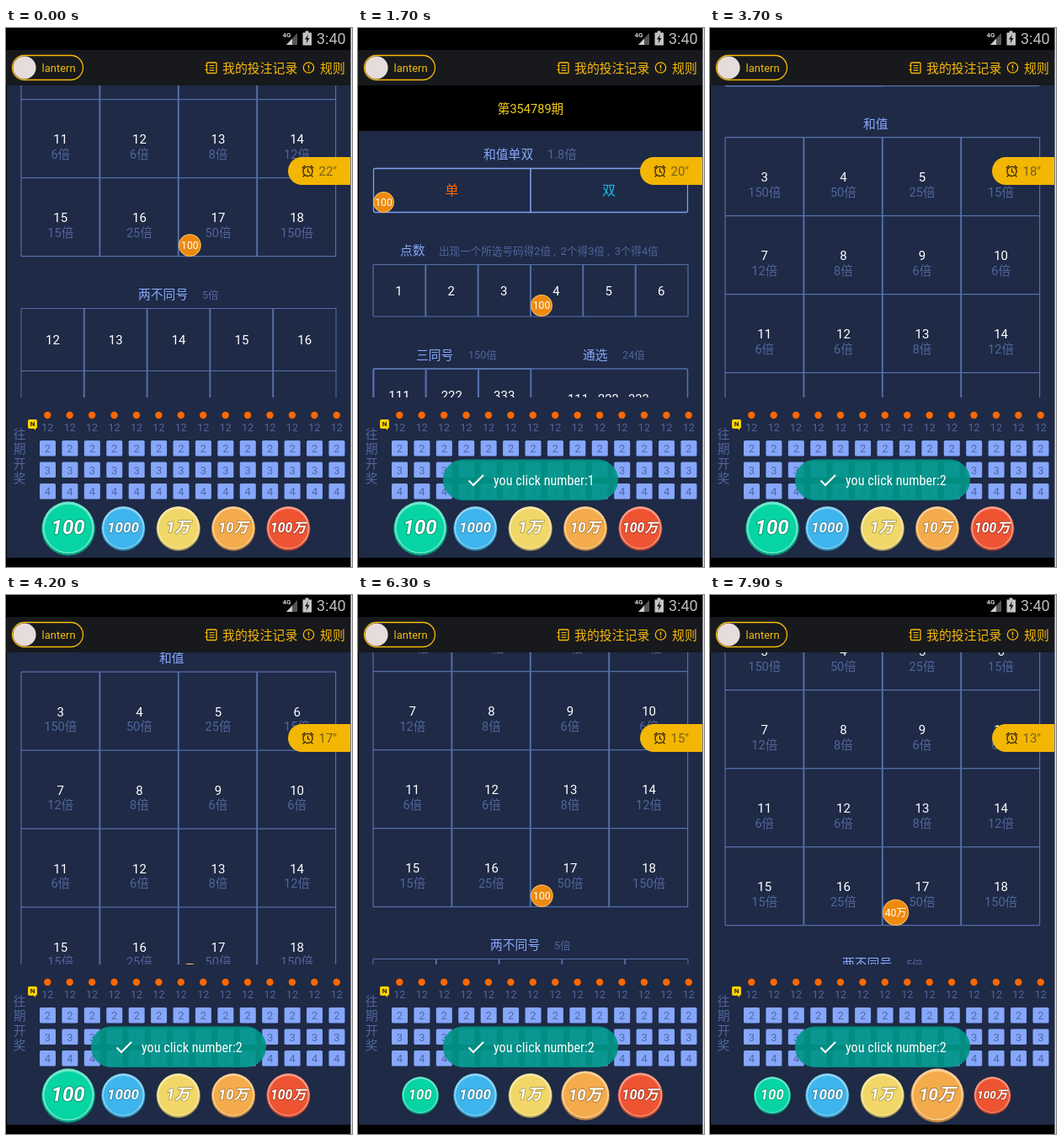
Animation of 411 by 639 pixels, one loop 8000 ms. Source, as an HTML page:

```html
<!DOCTYPE html>
<html lang="zh-CN">
<head>
<meta charset="utf-8">
<style>
html, body { margin: 0; width: 100%; height: 100%; overflow: hidden; background: #000; }
svg { display: block; width: 100vw; height: 100vh; }
text { font-family: Roboto, 'Noto Sans CJK SC', 'Noto Sans CJK', sans-serif; white-space: pre; }
#toast text { font-family: 'Roboto Condensed', Roboto, 'Open Sans', sans-serif; font-stretch: condensed; }
</style>
</head>
<body>
<svg id="stage" viewBox="0 0 411 639" xmlns="http://www.w3.org/2000/svg"></svg>
<script>
const LOOP = 8000, TICK = 100;
const BG = '#1e2a46', LINE = '#566fab', HEAD = '#88a8f8', DIM = '#50659c', GOLD = '#f7b909';
const BRIGHT = '#7f9eec', ORANGE = '#ff6700', INK = '#33290a';

// Drawing helpers; text y is the vertical middle of the glyphs.
const text = (x, y, s, size, fill, anchor = 'middle', extra = '') =>
  `<text x="${x}" y="${y + size * 0.36}" font-size="${size}" fill="${fill}" text-anchor="${anchor}" ${extra}>${s}</text>`;
const rect = (x, y, w, h, fill, extra = '') =>
  `<rect x="${x}" y="${y}" width="${w}" height="${h}" fill="${fill}" ${extra}/>`;
const circle = (x, y, r, fill, extra = '') =>
  `<circle cx="${x}" cy="${y}" r="${r}" fill="${fill}" ${extra}/>`;
const path = (d, stroke, width) => `<path d="${d}" fill="none" stroke="${stroke}" stroke-width="${width}"/>`;
const shape = (d, fill) => `<path d="${d}" fill="${fill}"/>`;
const range = (n, f) => Array.from({ length: n }, (_, i) => f(i)).join('');

function grid(x, y, cols, rows, w, h, edge = 1.2, inner = 1.9) {
  const across = range(rows + 1, i => `M${x} ${y + i * h}h${cols * w}`);
  const sides = `M${x} ${y}v${rows * h}m${cols * w} 0v${-rows * h}`;
  const down = range(cols - 1, i => `M${x + (i + 1) * w} ${y}v${rows * h}`);
  return path(across + sides, LINE, edge) + path(down, LINE, inner);
}

const heading = (x, y, title, subX = 0, sub = '', size = 12.6) =>
  text(x, y, title, 14.8, HEAD, 'start') + text(subX, y, sub, size, DIM, 'start');

// A chip is anchored at its bottom left corner.
const chip = (id, x, bottom, r = 13) =>
  `<g id="${id}" transform="translate(${x} ${bottom})"></g>`;
const chipFace = (label, r) =>
  circle(r, -r, r - 0.6, '#ee8a0c', 'stroke="#f6b45c" stroke-width="1.2"') + text(r, -r, label, 12.2, '#fff');

function board() {
  const odds = [150, 50, 25, 15, 12, 8, 6, 6];
  const cell = 374 / 6;
  return rect(1, 68, 408.5, 54, '#000') + text(205, 96, '第354789期', 14.6, '#f5cf18') +

    heading(149, 150, '和值单双', 225, '1.8倍', 14.6) +
    rect(18.5, 166.5, 373, 52, 'none', `rx="2" stroke="${BRIGHT}" stroke-width="1.3"`) +
    path('M205 166.5v52', BRIGHT, 1.6) +
    text(111.5, 192.5, '单', 16, ORANGE) + text(298, 192.5, '双', 16, '#16bdf0') +

    heading(50, 264, '点数', 96, '出现一个所选号码得2倍 ,  2个得3倍 ,  3个得4倍') +
    grid(18, 280.5, 6, 1, cell, 61.5) +
    range(6, i => text(48.5 + i * cell, 312, i + 1, 15, '#fff')) +

    heading(69, 387.5, '三同号', 131, '150倍') + heading(267, 387.5, '通选', 314, '24倍') +
    rect(18.5, 404, 373, 122, 'none', `rx="2" stroke="${LINE}" stroke-width="1.6"`) +
    grid(18.3, 404, 3, 2, cell, 61, 2, 2.2) +
    range(6, i => text(49 + i % 3 * cell, i > 2 ? 496.5 : 436, 111 * (i + 1), 15, '#fff')) +
    text(249, 440, '111   222   333', 14.8, '#fff', 'start') +
    text(250, 492.5, '444   555  666', 14.8, '#fff', 'start') +

    heading(182, 571, '和值') + grid(18, 587.2, 4, 4, 93.4, 93) +
    range(16, i => {
      const x = 64.8 + i % 4 * 93.6, y = 587 + (i >> 2) * 93;
      return text(x, y + 47.5, i + 3, 15, '#fff') +
        text(x, y + 65, odds[Math.min(i, 15 - i)] + '倍', 14.6, DIM);
    }) +

    heading(157, 1004.5, '两不同号', 233, '5倍') + grid(18, 1021, 5, 3, 74.8, 74, 1) +
    range(5, i => text(55.5 + i * 74.8, 1058.5, i + 12, 15, '#fff')) +

    chip('odd', 18, 219) + chip('even', 205, 219.5) + chip('four', 205, 342) + chip('sum', 205, 959.5);
}

function statusBar() {
  return rect(0, 0, 411, 26, '#000') +
    text(328.5, 8.5, '4G', 8, '#ccc', 'start', 'font-weight="700"') +
    shape('M333 20L346 6V20Z', '#555') + shape('M333 20L340 12.5V20Z', '#ccc') +
    shape('M352.5 5.5h3v-2h4v2h3.5v15h-10.5z', '#c4c4c4') +
    shape('M359 7.5l-4 6h2.5l-1 5 4-6.5h-2.5z', '#111') +
    text(369, 13, '3:40', 18, '#bdbdbd', 'start');
}

function header() {
  const outline = `stroke="${GOLD}" stroke-width="1.3"`;
  return rect(0, 26, 411, 42, '#17191c') +
    rect(7.5, 32.5, 84, 29, 'none', `rx="14.5" ${outline}`) +
    circle(22, 47, 13.6, '#e6dcdc') + text(42.5, 47, 'lantern', 13, GOLD, 'start') +
    rect(238.5, 41, 11.5, 12.5, 'none', `rx="1" ${outline}`) +
    path('M241.5 44.5h6m-6 2.8h6m-6 2.8h6M236.5 44.5h3m-3 5h3', GOLD, 1.1) +
    text(257, 47.5, '我的投注记录', 14.9, GOLD, 'start') +
    circle(359.5, 47, 6.2, 'none', outline) + path('M359.5 43.5v4.3m0 1.2v1.5', GOLD, 1.5) +
    text(373, 47.5, '规则', 14.9, GOLD, 'start');
}

function timer() {
  return shape('M409 153H351.5a16.5 16.5 0 0 0 0 33H409z', '#f3b602') +
    circle(358.5, 170, 5.6, 'none', `stroke="${INK}" stroke-width="1.3"`) +
    path('M358.5 166.5v3.8l2.5 1.5M351.7 166.3l3.6-3.3m10 3.3l-3.6-3.3M354.5 174.5l-2 2m10-2l2 2', INK, 1.3) +
    text(371.5, 170, '', 15, '#75601f', 'start', 'id="clock"');
}

function results() {
  const title = [...'往期开奖'].map((c, i) => text(16.2, 481.5 + i * 17.4, c, 14.8, DIM)).join('');
  const tag = shape('M28 464h7a2 2 0 0 1 2 2v7a2 2 0 0 1-2 2v2l-2-2h-5a2 2 0 0 1-2-2v-7a2 2 0 0 1 2-2z', '#fdd000') +
    text(31.5, 469.5, 'N', 8, '#222', 'middle', 'font-weight="700"');
  return title + tag + range(14, i => {
    const x = 49.3 + i * 26.42;
    return circle(x, 459, 4.2, ORANGE) + text(x, 473.5, 12, 12.6, DIM) +
      range(3, j => rect(x - 9.3, 489 + j * 25.5, 19, 18.5, '#86a7fc', 'rx="1.5"') +
        text(x + 0.2, 498.5 + j * 25.5, j + 2, 13, '#5068a8'));
  });
}

const COINS = [['100', '#06d5a3'], ['1000', '#3eb5ec'], ['1万', '#f0d768'], ['10万', '#f4ab4c'], ['100万', '#ee5432']];
const REST = 26, PICKED = 31.7, DROPPED = 22;

function coin([label, fill], i) {
  const size = label.endsWith('万') ? 20.2 - 1.1 * label.length : 27.6 - 2.6 * label.length;
  return `<g id="coin${i}">` + circle(0, 0.5, REST, fill) + circle(0, 0.5, REST, '#000', 'opacity=".25"') +
    circle(0, -0.7, 25.2, fill) + circle(0, -0.7, 25.2, '#fff', 'opacity=".42"') + circle(0, 0, 23.3, fill) +
    text(-0.3, -1.2, label, size, '#fff', 'middle', 'font-weight="700" font-style="italic" ' +
      'stroke="#000" stroke-opacity=".28" stroke-width="1.7" stroke-linejoin="round" paint-order="stroke"') + '</g>';
}

const stage = document.getElementById('stage');
stage.innerHTML =
  '<defs><clipPath id="view"><rect x="0" y="68" width="411" height="370"/></clipPath></defs>' +
  rect(0, 0, 411, 639, '#000') + rect(1, 68, 408.5, 560, BG) +
  `<g clip-path="url(#view)"><g id="board">${board()}</g></g>` +
  statusBar() + header() + timer() + results() + COINS.map(coin).join('') +
  '<g id="toast">' + rect(101, 511.5, 208, 48.5, '#009688', 'rx="24" opacity=".92"') +
  path('M131.5 536.5l5.5 5.5 12-12', '#fff', 2) +
  text(161, 536, '', 16.2, '#fff', 'start', 'id="message"') + '</g>' +
  rect(409.5, 0, 1.5, 639, '#e4e6ea');

const $ = id => document.getElementById(id);
const clamp = p => Math.min(1, Math.max(0, p));
const easeOut = p => 1 - (1 - clamp(p)) ** 3;

// Swipes: start, duration, resting offset.
const SWIPES = [[300, 300, 0], [2500, 500, 86.5], [3100, 1100, 496], [5200, 300, 589.5], [6800, 400, 567.5]];
const scrollAt = t => SWIPES.reduce((pos, [start, time, to]) =>
  pos + (to - pos) * easeOut((t - start) / time), 688.5);

// Coin taps: start, duration, coin. The previous coin shrinks below its resting size.
const TAPS = [[4600, 400, 4], [6200, 200, 3]];
function coinRadius(i, t) {
  let r = i ? REST : PICKED, last = 0;
  for (const [start, time, pick] of TAPS) {
    const to = i === pick ? PICKED : i === last ? DROPPED : r;
    r += (to - r) * clamp((t - start) / time);
    last = pick;
  }
  return r;
}

// Number of bets laid on a field by regular taps.
const bets = (t, start, gap) => Math.floor((t - start) / gap);

function setChip(id, label, r) {
  $(id).innerHTML = label ? chipFace(label, r) : '';
}

function drawChips(t) {
  const even = Math.min(3, bets(t, 1680, 210));
  const sum = bets(t, 7250, 150) + (t >= 7300 ? 0 : 0);
  setChip('four', '100', 13);
  setChip('odd', t >= 1400 && '100', 12.5);
  setChip('even', t >= 2000 && even * 100, 12.5);
  setChip('sum', t >= 7300 ? Math.max(1, sum) + '0万' : '100', t >= 7300 ? 15.6 : 13.4);
}

function drawToast(t) {
  const age = t - 1350, period = 1950;
  $('toast').setAttribute('opacity', age < 0 ? 0 : 1 - Math.exp(-(age % period) / 50));
  $('message').textContent = 'you click number:' + (age < period ? 1 : 2);
}

function draw(t) {
  $('board').setAttribute('transform', `translate(0 ${-scrollAt(t)})`);
  $('clock').textContent = 21 - Math.floor((t - 125) / 925) + '″';
  COINS.forEach((_, i) => $('coin' + i).setAttribute('transform',
    `translate(${74 + i * 65.35} 593.2) scale(${coinRadius(i, t) / REST})`));
  drawChips(t);
  drawToast(t);
}

const start = performance.now();
function frame() {
  const t = (performance.now() - start) % LOOP;
  draw(Math.floor(t / TICK) * TICK);
  requestAnimationFrame(frame);
}
draw(0);
requestAnimationFrame(frame);
</script>
</body>
</html>
```
